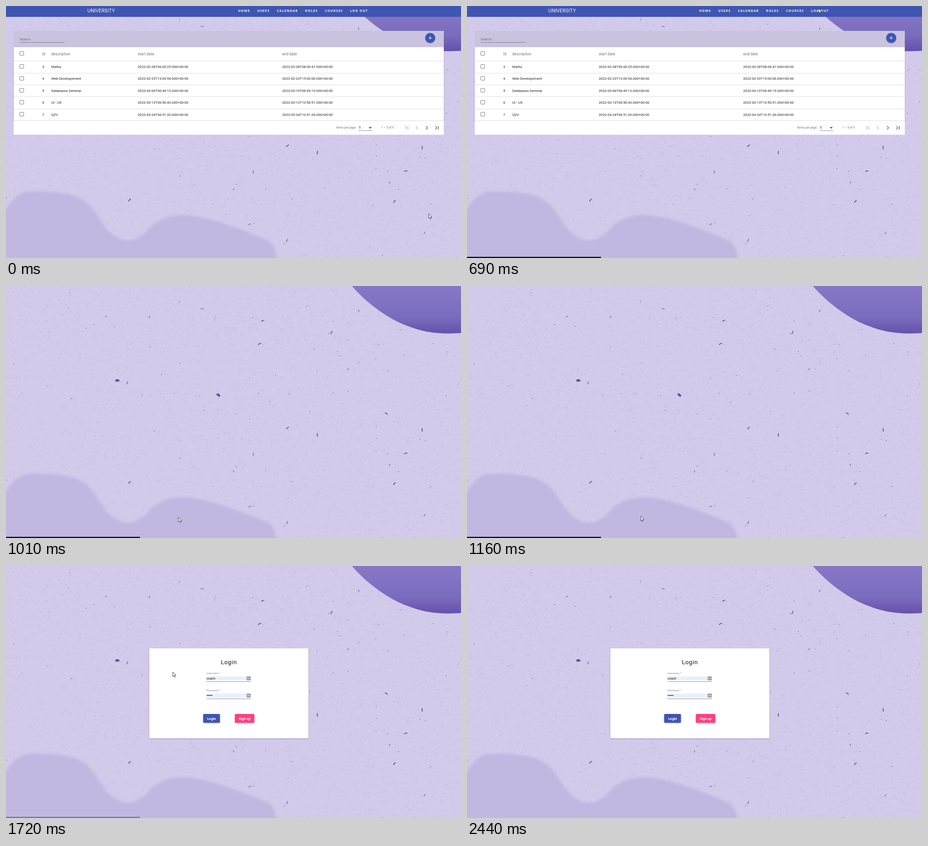
An HTML page with a canvas for the animation above (2.98 s loop, 1005 by 557 pixels).

```html
<!DOCTYPE html>
<html lang="en">
<head>
<meta charset="utf-8">
<title>University log out</title>
<style>
  html, body { margin: 0; width: 100%; height: 100%; overflow: hidden; background: #d1caea; }
  canvas, svg { position: absolute; left: 0; top: 0; width: 1005px; height: 557px; overflow: hidden; }
  text { font-family: Roboto, sans-serif; white-space: pre; }
  .brand { font: 400 10.3px Inter, sans-serif; fill: #fff; }
  .nav { font: 700 7px "Open Sans", sans-serif; letter-spacing: 1.2px; fill: #fff; }
  .head { font-size: 8.45px; fill: #757575; }
  .cell { font-size: 7.7px; fill: #212121; }
  .search { font-size: 7.8px; fill: #716c80; }
  .foot { font-size: 6.5px; fill: #757575; }
  .title { font-size: 13px; letter-spacing: .7px; fill: #111; }
  .label { font-size: 5.3px; letter-spacing: .25px; fill: #7d7690; }
  .value { font-size: 7.2px; fill: #111; }
  .button { font-size: 7.7px; font-weight: 700; fill: #fff; text-anchor: middle; }
  .raised { filter: drop-shadow(0 1px 1px rgba(40, 30, 80, .35)); }
</style>
</head>
<body>
<canvas id="backdrop" width="1005" height="557"></canvas>
<svg width="1005" height="557" viewBox="0 0 1005 557">
  <g id="courses">
    <rect width="1005" height="24" fill="#3f55b2"/>
    <text class="brand" x="179.5" y="13.5">UNIVERSITY</text>
    <text class="nav" x="513" y="12.5" id="links"></text>
    <rect class="raised" x="17" y="91" width="950" height="163" fill="#fff"/>
    <rect x="17" y="55" width="950" height="36" fill="#cac3df"/>
    <rect x="17" y="91" width="950" height="193.5" fill="#fff"/>
    <text class="search" x="30" y="76">Search...</text>
    <path d="M30 80.5H129" stroke="#837c96"/>
    <circle class="raised" cx="937" cy="70.5" r="11" fill="#3f55b2"/>
    <path d="M933.5 70.5h7M937 67v7" stroke="#fff" stroke-width="1.2"/>
    <g id="table"></g>
    <text class="foot" x="729" y="271">Items per page:</text>
    <text class="foot" x="779.5" y="271" style="fill:#222">5</text>
    <path d="M779 275.5h30" stroke="#8c94c4"/>
    <path d="M801 267.5h7l-3.5 3.7z" fill="#5c5c5c"/>
    <text class="foot" x="829" y="270.5">1 – 5 of 9</text>
    <g fill="none" stroke-width="1.3">
      <path d="M882.5 265v8.5M889.5 265.5l-4 3.7 4 3.7M909.5 265.5l-4 3.7 4 3.7" stroke="#bcbcbc"/>
      <path d="M927.5 265.5l4 3.7-4 3.7M948 265.5l4 3.7-4 3.7M955 265v8.5" stroke="#606060"/>
    </g>
  </g>
  <g id="login">
    <rect class="raised" x="316.5" y="182" width="351.5" height="199" rx="2" fill="#fff"/>
    <text class="title" x="474.5" y="217">Login</text>
    <g id="fields"></g>
    <g id="badges"></g>
    <g id="buttons"></g>
  </g>
  <rect id="status" y="554.5" width="296" height="2.5"/>
  <path id="arrow" d="M.4.3V10.3L2.8 8.2 4.3 11.8 5.9 11.1 4.4 7.6H7.6Z" fill="#fff" stroke="#222" stroke-width=".85"/>
  <path id="hand" d="M3.3 7.5V1.3Q3.3.4 4.2.4T5.1 1.3V4.6L8 5.2Q9.3 5.5 9.2 6.8L8.5 11V13.5H3.7L1.1 9.3Q0 7.6 1.5 7.2Z" fill="#fff" stroke="#222" stroke-width=".8"/>
</svg>
<script>
const WIDTH = 1005, HEIGHT = 557, SCROLL = 5, LOOP = 2980, STEP = 78;
const $ = id => document.getElementById(id);
const label = (kind, x, y, words) => `<text class="${kind}" x="${x}" y="${y}">${words}</text>`;
const checkbox = y => `<rect x="30.5" y="${y}" width="8.5" height="8.3" rx=".8" fill="none" stroke="#777"/>`;
const rule = y => `<path d="M17 ${Math.floor(y) + .5}H967" stroke="#dfdfdf"/>`;
const dots = (x, y, gap, count, r, fill) => Array.from({ length: count }, (_, i) =>
  `<circle cx="${x + i * gap}" cy="${y}" r="${r}" fill="${fill}"/>`).join("");

function buildCourses() {
  $("links").innerHTML = ["HOME", "USERS", "CALENDAR", "ROLES", "COURSES", "LOG OUT"]
    .map((name, i) => `<tspan dx="${i && 15.7}">${name}</tspan>`).join("");

  const rows = [
    ["Maths", "2022-02-28T06:00:25", "2022-02-28T08:00:47"],
    ["Web Developement", "2022-02-23T13:00:54", "2022-02-23T15:00:06"],
    ["Databases Seminar", "2022-03-06T06:49:13", "2022-03-10T06:49:19"],
    ["UI - UX", "2022-03-13T06:50:43", "2022-03-13T10:50:51"],
    ["QZV", "2022-03-24T06:51:20", "2022-03-24T10:51:26"]
  ];
  const columns = [80, 100, 291, 610];
  const line = (kind, y, words) => words.map((word, i) => label(kind, columns[i], y, word)).join("");
  $("table").innerHTML = checkbox(100.7) + rule(121.5) +
    line("head", 109, ["Id", "description", "start date", "end date"]) +
    rows.map(([name, start, end], i) => {
      const y = 137 + i * 26.4;
      return checkbox(y - 7.6) + rule(y + 11) +
        line("cell", y, [i + 3, name, start + ".000+00:00", end + ".000+00:00"]);
    }).join("");
}

function buildLogin() {
  const field = (y, name) => label("label", 443, y, name) +
    `<rect x="443" y="${y + 5}" width="98.5" height="8.5" fill="#e8f0fe"/>
     <path d="M443 ${y + 16.5}h98.5" stroke="#8d8d92"/>`;
  const badge = y => `<rect x="531.5" y="${y}" width="9" height="8.8" rx="1" fill="#9b9fa8"/>` +
    dots(533.8, y + 4.4, 2.2, 3, .8, "#fff");
  const button = (x, width, fill, name) =>
    `<rect class="raised" x="${x}" y="327" width="${width}" height="19.5" rx="2" fill="${fill}"/>` +
    label("button", x + width / 2, 339.6, name);
  $("fields").innerHTML = field(239, "Username *") + field(277, "Password *") +
    label("value", 442.8, 250.7, "coach") + dots(444.3, 286, 2.6, 5, 1.05, "#111");
  $("badges").innerHTML = badge(244) + badge(282);
  $("buttons").innerHTML = button(435.5, 37, "#3f55b2", "Login") + button(505.5, 43, "#ff4081", "Sign up");
}

function randomFrom(seed) {
  return () => (seed = (seed * 16807) % 2147483647) / 2147483647;
}

function drawTexture(ctx, height) {
  const random = randomFrom(4711);
  const strand = (x, y, angle, length, width, alpha, color) => {
    const dx = Math.cos(angle) * length / 2, dy = Math.sin(angle) * length / 2;
    ctx.globalAlpha = alpha;
    ctx.strokeStyle = color;
    ctx.lineWidth = width;
    ctx.beginPath();
    ctx.moveTo(x - dx, y - dy);
    ctx.quadraticCurveTo(x + dy * .4, y - dx * .4, x + dx, y + dy);
    ctx.stroke();
  };
  const scatter = (count, draw) => {
    for (let i = 0; i < count; i++) draw(random() * WIDTH, random() * height);
  };
  const ink = "#4d478c";
  ctx.lineCap = "round";
  scatter(9000, (x, y) => strand(x, y, (random() - .5) * 2.4, 1 + random() * 6, .5 + random() * .7,
    .05 + random() * .18, random() < .5 ? "#fff" : "#8b82bd"));
  scatter(900, (x, y) => strand(x, y, 0, .5, 1, .15 + random() * .3, "#5f5897"));
  scatter(75, (x, y) => strand(x, y, 0, .4, 1.5, .8, ink));
  scatter(14, (x, y) => strand(x, y, random() * 3, 3 + random() * 3, 1.4, .8, ink));

  // the largest flakes: x, y, tilt
  const flakes = [
    [246, 209, 0], [469, 241, .7], [567, 77, -.5], [560, 128, -.5], [622, 314, -.7], [688, 329, -1.5],
    [719, 103, -1.1], [840, 282, .6], [858, 437, -.8], [883, 370, -.3], [919, 318, 1.5], [273, 434, -.8]
  ];
  flakes.forEach(([x, y, tilt], i) => strand(x, y, tilt, i < 2 ? 4 : 6, i < 2 ? 5 : 1.8, .9, ink));
  ctx.globalAlpha = 1;
}

function shade(ctx, height, ...colors) {
  const gradient = ctx.createLinearGradient(0, 0, 0, height);
  colors.forEach((color, i) => gradient.addColorStop(i / (colors.length - 1), color));
  return gradient;
}

function drawPaper() {
  const paper = document.createElement("canvas");
  paper.width = WIDTH;
  paper.height = HEIGHT + SCROLL;
  const ctx = paper.getContext("2d");
  ctx.fillStyle = "#d1caea";
  ctx.fillRect(0, 0, WIDTH, paper.height);
  drawTexture(ctx, paper.height);

  ctx.filter = "blur(2.5px)";
  ctx.fillStyle = "#c0b8e1";
  ctx.fill(new Path2D(`M0 454Q25 415 50 415C190 412 185 450 220 495Q268 550 315 498
    C365 445 440 465 580 524Q598 535 599 585H-9V466Z`));
  ctx.filter = "none";

  ctx.fillStyle = shade(ctx, 105, "#8678c5", "#8173c2", "#7a6cbd", "#6650ab");
  ctx.fill(new Path2D("M764 0C800 42 850 75 885 87.5C915 100 945 105 980 105L1005 104V0Z"));
  return paper;
}

// Pointer strokes, each bent towards a control point.
const easeOut = s => 1 - (1 - s) ** 2;
const easeIn = s => s * s;
const easeBoth = s => s * s * (3 - 2 * s);
const strokes = [
  { start: 0, end: 440, from: [933, 459], bend: [845, 150], to: [776, 5], ease: easeBoth },
  { start: 640, end: 930, from: [776, 5], bend: [600, 300], to: [378, 513.5], ease: easeBoth },
  { start: 930, end: 1320, from: [378, 513.5], bend: [385, 508], to: [391, 499.5], ease: s => s },
  { start: 1320, end: 1720, from: [391, 499.5], bend: [383, 380], to: [368, 234], ease: easeIn },
  { start: 1720, end: 1800, from: [368, 234], bend: [410, 205], to: [458, 185], ease: s => s },
  { start: 1800, end: 2350, from: [458, 185], bend: [800, 20], to: [956.5, 520], ease: easeOut }
];

function pointerAt(t) {
  const { start, end, from, bend, to, ease } = strokes.findLast(stroke => stroke.start <= t);
  // The picture is refreshed in whole steps, so the pointer jumps.
  const stepped = Math.floor((t - start) / STEP) * STEP;
  const u = ease(t >= end ? 1 : stepped / (end - start));
  return from.map((a, i) => (1 - u) ** 2 * a + 2 * u * (1 - u) * bend[i] + u * u * to[i]);
}

const show = (id, on) => $(id).style.display = on ? "" : "none";
const backdrop = $("backdrop").getContext("2d");
const paper = drawPaper();

function render(t) {
  const loggedIn = t < 1010;
  const overLink = t >= 370 && t < 690;
  backdrop.drawImage(paper, 0, loggedIn ? -SCROLL : 0);
  show("courses", loggedIn);
  show("login", t >= 1320);
  show("badges", t >= 1560);
  show("status", t >= 690 && t < 1800);
  $("status").setAttribute("fill", t < 1720 ? "#08080c" : "#7b768d");
  show("arrow", !overLink && t < 2440);
  show("hand", overLink);
  $(overLink ? "hand" : "arrow").setAttribute("transform", `translate(${pointerAt(t)})`);
}

function tick() {
  render(performance.now() % LOOP);
  requestAnimationFrame(tick);
}

buildCourses();
buildLogin();
tick();
</script>
</body>
</html>
```
